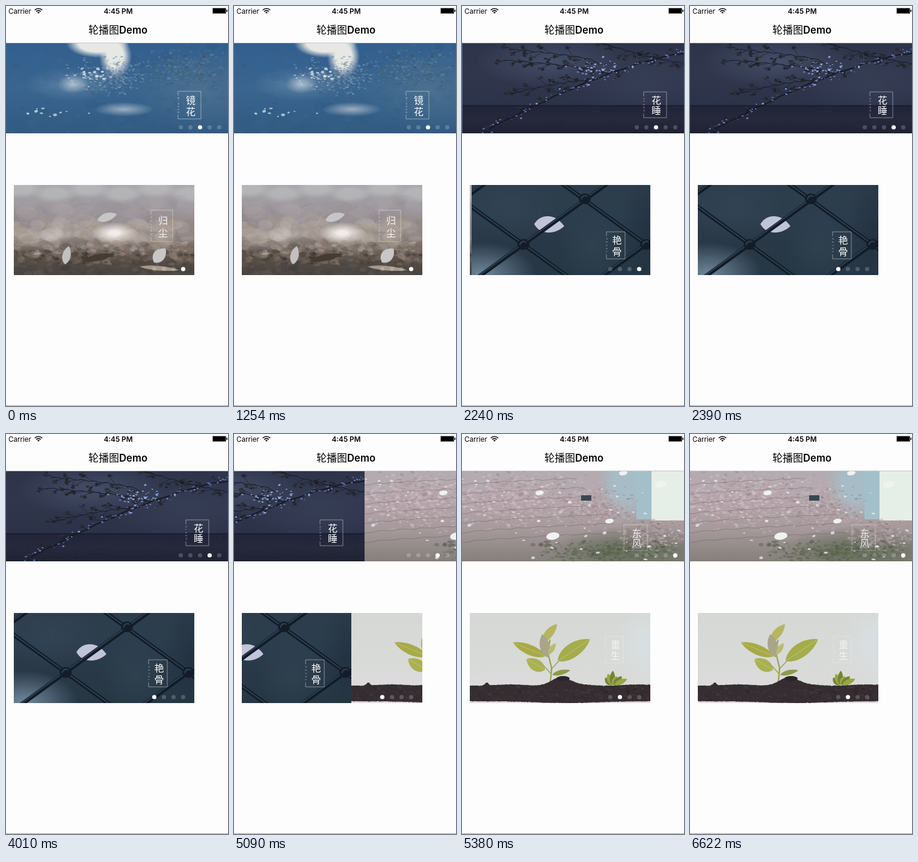
Animation of 369 by 666 pixels, one loop 7450 ms. Source, as an HTML page with a canvas:

```html
<!DOCTYPE html>
<html lang="zh">
<head>
<meta charset="utf-8">
<title>轮播图Demo</title>
<style>
html, body { margin: 0; width: 100%; height: 100%; overflow: hidden; background: #fdfdfd; }
canvas { display: block; width: 369px; height: 666px; }
</style>
</head>
<body>
<canvas id="stage" width="369" height="666"></canvas>
<script>
const screen2d = document.getElementById('stage').getContext('2d');
const SANS = 'Inter, "Noto Sans CJK SC", "Noto Sans CJK", sans-serif';
const TAU = Math.PI * 2;
let g = screen2d;

let seed = 1;
function rand() {
  seed = (seed * 16807) % 2147483647;
  return seed / 2147483647;
}
const spread = n => (rand() + rand() + rand() - 1.5) / 1.5 * n;
const bump = (x, center, width) => Math.exp(-(((x - center) / width) ** 2));

function rect(x, y, w, h, color) {
  g.fillStyle = color;
  g.fillRect(x, y, w, h);
}

function fade(x, y, w, h, ...colors) {
  const fill = g.createLinearGradient(0, y, 0, y + h);
  colors.forEach((c, i) => fill.addColorStop(i / (colors.length - 1), c));
  rect(x, y, w, h, fill);
}

function oval(x, y, rx, ry, color, turn = 0) {
  g.fillStyle = color;
  g.beginPath();
  g.ellipse(x, y, rx, ry, turn, 0, TAU);
  g.fill();
}

// Soft ellipse; core is the solid share of its radius.
function glow(x, y, rx, ry, color, alpha = 1, core = 0) {
  const fill = g.createRadialGradient(0, 0, 0, 0, 0, 1);
  fill.addColorStop(core, color);
  fill.addColorStop(1, color + '00');
  g.save();
  g.globalAlpha = alpha;
  g.translate(x, y);
  g.scale(rx, ry);
  g.fillStyle = fill;
  g.fillRect(-1, -1, 2, 2);
  g.restore();
}

function line(points, width, color) {
  g.strokeStyle = color;
  g.lineWidth = width;
  g.lineCap = g.lineJoin = 'round';
  g.beginPath();
  points.forEach(([x, y]) => g.lineTo(x, y));
  g.stroke();
}

function leaf(x, y, degrees, length, width, color, vein) {
  g.save();
  g.translate(x, y);
  g.rotate(-degrees * Math.PI / 180);
  g.fillStyle = color;
  g.beginPath();
  g.moveTo(0, 0);
  g.bezierCurveTo(length * 0.2, -width * 0.7, length * 0.7, -width * 0.7, length, 0);
  g.bezierCurveTo(length * 0.7, width * 0.6, length * 0.2, width * 0.6, 0, 0);
  g.fill();
  if (vein) line([[0, 0], [length, 0]], 0.8, vein);
  g.restore();
}

// Placement and colour rules for random specks.
const cloud = (x, y, rx, ry) => () => [x + spread(rx), y + spread(ry)];
const field = (x, y, w, h) => () => [x + rand() * w, y + rand() * h];
const along = (path, s) => () => {
  const [x, y] = path[Math.floor(rand() * path.length)];
  return [x + spread(s), y + spread(s * 0.8)];
};
const tint = (hue, sat, light, range, alpha) => () =>
  `hsla(${hue}, ${sat}%, ${light + spread(range)}%, ${alpha})`;

function speckle(count, size, place, shade) {
  for (let i = 0; i < count; i++) {
    const r = size * (0.4 + rand() * 0.8);
    oval(...place(), r, r * (0.35 + rand() * 0.4), shade(), spread(0.6));
  }
}

function bough(x0, y0, x1, y1, bend) {
  return Array.from({ length: 25 }, (_, i) => {
    const k = i / 24;
    return [x0 + (x1 - x0) * k, y0 + (y1 - y0) * k ** bend + Math.sin(i * 1.9)];
  });
}

function caption(x, y, w, h, chars, latin, alpha = 0.8) {
  g.save();
  g.globalAlpha = alpha * 0.8;
  line([[x, y + 7], [x, y], [x + w, y], [x + w, y + h], [x, y + h], [x, y + h - 7]], 0.7, '#fff');
  g.fillStyle = '#fff';
  g.textAlign = 'center';
  g.textBaseline = 'middle';
  g.font = `4px ${SANS}`;
  const step = (h - 18) / latin.length;
  [...latin].forEach((c, i) => {
    g.save();
    g.translate(x, y + 9 + step * (i + 0.5));
    g.rotate(Math.PI / 2);
    g.fillText(c, 0, 0);
    g.restore();
  });
  g.globalAlpha = Math.min(1, alpha + 0.2);
  g.font = `400 16px "Noto Sans CJK SC", "Noto Sans CJK", sans-serif`;
  [...chars].forEach((c, i) => g.fillText(c, x + w / 2 + 2, y + h * (0.32 + i * 0.41)));
  g.restore();
}

function mirror() {
  fade(-2, 62, 375, 150, '#335f8f', '#39658f', '#325a82');
  glow(330, 140, 120, 70, '#587890', 0.6);
  glow(110, 130, 80, 28, '#7896b2', 0.6);
  speckle(260, 9, field(-2, 62, 375, 150), tint(210, 40, 38, 14, 0.13));
  glow(152, 62, 52, 24, '#e7e8e4', 1, 0.6);
  glow(182, 84, 27, 36, '#e7e8e4', 1, 0.5);
  glow(112, 130, 26, 16, '#c3d0da', 0.8);
  glow(196, 172, 50, 12, '#b4c4d2', 0.8);
  speckle(420, 2.4, cloud(175, 115, 90, 42), tint(208, 25, 55, 25, 0.5));
  speckle(500, 2.6, cloud(300, 105, 95, 45), tint(207, 28, 42, 18, 0.5));
  speckle(45, 2.6, cloud(145, 112, 55, 28), tint(205, 30, 85, 9, 0.8));
  speckle(10, 2.8, cloud(90, 175, 80, 20), tint(205, 30, 85, 8, 0.8));
  caption(286, 142, 38, 46, '镜花', 'MIRROR');
}

function sleep() {
  fade(-2, 62, 375, 104, '#2e354b', '#30374d', '#2c3248');
  glow(145, 92, 125, 44, '#525d7b', 0.6);
  glow(300, 130, 120, 60, '#3c455f', 0.5);
  fade(-2, 166, 375, 46, '#222538', '#26293b', '#1f2233');
  line([[-2, 166], [373, 166]], 1.4, '#171a28');
  speckle(260, 1.5, field(-2, 168, 375, 44), tint(232, 20, 16, 8, 0.4));
  const main = bough(373, 78, 38, 207, 1.4);
  const sides = [bough(240, 113, 66, 90, 0.6), bough(225, 97, 75, 72, 0.5),
    bough(373, 96, 230, 62, 1.3), bough(205, 124, 80, 146, 1.5)];
  line(main, 2, '#151823');
  for (const path of [main, ...sides]) {
    line(path, 1, '#171a25');
    for (const [x, y] of path.filter((_, i) => i % 2)) {
      const tip = [x - 8 - rand() * 14, y + spread(18)];
      line([[x, y], tip], 0.7, '#1a1d28');
      speckle(6, 3, along([tip], 9), tint(220, 12, 17, 8, 0.9));
    }
  }
  speckle(85, 1.8, along(main, 14), tint(228, 50, 65, 18, 0.9));
  speckle(55, 2, cloud(215, 103, 65, 24), tint(226, 55, 72, 15, 0.9));
  caption(299, 143, 38, 43, '花睡', 'SLEEP');
}

function eastWind() {
  fade(-2, 62, 375, 150, '#b3abb0', '#b5a8ad', '#a4989a', '#84807a');
  glow(275, 80, 50, 65, '#a6bdc8', 1, 0.4);
  rect(290, 62, 25, 80, '#a3c0ca');
  rect(315, 62, 58, 82, '#e5eee7');
  glow(285, 195, 140, 42, '#69705f', 0.9, 0.3);
  speckle(1100, 3.2, cloud(90, 110, 170, 65), tint(342, 13, 70, 20, 0.55));
  speckle(450, 2.6, cloud(230, 125, 70, 45), tint(342, 10, 66, 22, 0.5));
  speckle(450, 3, cloud(320, 170, 75, 30), tint(345, 8, 62, 22, 0.5));
  speckle(360, 3.4, cloud(235, 195, 150, 22), tint(85, 12, 36, 15, 0.5));
  for (let i = 0; i < 7; i++) {
    line(bough(-2, 85 + i * 16, 190 + i * 12, 74 + i * 15, 0.7), 0.8, 'rgba(88,76,82,.45)');
  }
  rect(198, 102, 17, 9, '#374852');
  speckle(60, 2.8, field(0, 75, 369, 135), tint(220, 15, 92, 5, 0.8));
  for (const [x, y, r] of [[129, 98, 7], [151, 170, 11], [330, 84, 10], [245, 145, 7], [268, 65, 7]]) {
    oval(x, y, r, r * 0.55, '#f0f2f2', -0.15);
  }
  caption(269, 151, 39, 43, '东风', 'EASTWIND', 0.65);
}

function dust() {
  fade(13, 298, 300, 150, '#a8a8ac', '#9d9a9f', '#948d8f', '#877e7a', '#5c534d', '#4a4440');
  for (let i = 0; i < 6; i++) glow(25 + i * 56, 305 + i % 2 * 8, 36, 15, '#bfc0c2', 0.6, 0.5);
  glow(28, 350, 60, 24, '#77707a', 0.5);
  speckle(85, 19, field(13, 325, 300, 40), tint(330, 4, 63, 15, 0.16));
  speckle(110, 16, field(13, 358, 300, 38), tint(28, 13, 66, 26, 0.22));
  glow(180, 378, 40, 18, '#f3ece6', 1, 0.2);
  glow(75, 382, 42, 13, '#d7cfc9', 0.7);
  speckle(170, 8, field(13, 393, 300, 22), tint(25, 11, 53, 32, 0.4));
  speckle(230, 6, field(13, 408, 300, 22), tint(28, 12, 34, 30, 0.5));
  fade(13, 422, 300, 26, '#49423e00', '#4a4541');
  speckle(70, 8, field(13, 426, 300, 22), tint(25, 7, 30, 12, 0.4));
  leaf(152, 357, 18, 34, 14, '#c6c5c8');
  leaf(98, 430, 78, 31, 14, '#c4c0c0');
  leaf(246, 427, 50, 30, 20, '#cac6c5');
  leaf(126, 425, 12, 56, 11, '#443b34');
  leaf(222, 434, -5, 66, 8, '#a69887');
  caption(241, 340, 36, 52, '归尘', 'RETURN', 0.72);
}

function petal() {
  fade(13, 298, 300, 150, '#2d3d4b', '#2c3d4d', '#293846', '#263744');
  glow(75, 335, 80, 55, '#384959', 0.5);
  glow(215, 400, 60, 65, '#344a59', 0.5);
  glow(310, 370, 50, 100, '#1e2c3b', 0.6);
  glow(30, 446, 90, 52, '#7891a6', 0.8, 0.1);
  leaf(117, 363, -4, 50, 28, '#c1c4d8');
  // Each wire zigzags between two neighbouring rows of knots.
  const columns = [-1, 0, 1, 2, 3];
  for (let row = 0; row < 3; row++) {
    const path = columns.map(c => [99 + c * 102, 249 + 74 * (row + Math.abs(row + c) % 2)]);
    line(path, 7, '#111c28');
    line(path.map(([x, y]) => [x - 1, y - 1.3]), 2, '#304150');
  }
  for (let c = 0; c < 3; c++) {
    const x = 99 + c * 102, y = c % 2 ? 321 : 397;
    oval(x, y, 10, 9, '#131d29');
    oval(x - 1, y - 2, 6, 4, '#2d3c4a', -0.5);
    oval(x, y, 5, 3.5, '#131d29', -0.5);
  }
  caption(237, 376, 31, 45, '艳骨', 'PETAL');
}

function rebirth() {
  fade(13, 298, 300, 150, '#d6d8d5', '#d8dad7', '#dcdcdb');
  glow(310, 350, 55, 70, '#d9dfe2', 0.8, 0.3);
  glow(80, 407, 75, 17, '#dfdae0', 0.7);
  line([[147, 412], [149, 390], [143, 365], [146, 343]], 2.2, '#98a04a');
  line([[147, 398], [136, 386]], 1.4, '#98a04a');
  line([[148, 392], [162, 377]], 1.4, '#98a04a');
  leaf(139, 370, 157, 59, 17, '#a8aa48', '#c3c473');
  leaf(159, 378, 34, 65, 24, '#a5ac4b', '#c6ca78');
  leaf(138, 393, 149, 36, 20, '#a9b153', '#c3c97b');
  leaf(134, 346, 51, 38, 14, '#b5b660');
  leaf(143, 372, 104, 40, 17, '#a9a58a');
  leaf(144, 367, 58, 22, 9, '#b9bb70');
  leaf(150, 401, 14, 31, 8, '#8f9a45');
  for (let i = 0; i < 6; i++) leaf(248 + i, 418, 130 - i * 21, 16 + i % 3 * 4, 9, i % 2 ? '#98a645' : '#748336');
  const top = x => 418 + Math.sin(x / 17) - 13 * bump(x, 164, 22) - 5 * bump(x, 41, 4);
  g.fillStyle = '#352d31';
  g.beginPath();
  for (let x = 13; x <= 313; x++) g.lineTo(x, top(x) + spread(0.8));
  for (let x = 313; x >= 13; x--) g.lineTo(x, 445 + 3 * bump(x, 175, 70) + spread(0.8));
  g.fill();
  speckle(300, 3.2, field(13, 421, 300, 23), tint(335, 10, 21, 11, 0.5));
  oval(168, 407, 11, 4, '#29252a');
  caption(238, 337, 30, 44, '重生', 'REBIRTH', 0.5);
}

function makeSlide(paint, { x, y, width }, index) {
  const page = document.createElement('canvas');
  page.width = width;
  page.height = 150;
  g = page.getContext('2d');
  g.translate(-x, -y);
  seed = 7919 * (index + 1);
  paint();
  g = screen2d;
  return page;
}

const banner = { x: -2, y: 62, width: 375, dotX: 290.5, dots: 5, first: 2, progress: [0, 0.416, 0.992] };
const card = { x: 13, y: 298, width: 300, dotX: 246.5, dots: 4, first: 3, progress: [0, 0.393, 0.99] };
banner.slides = [mirror, sleep, eastWind].map((p, i) => makeSlide(p, banner, i));
card.slides = [dust, petal, rebirth].map((p, i) => makeSlide(p, card, i));

function drawCarousel(c, page, phase) {
  const shift = Math.round(c.width * c.progress[phase]);
  g.save();
  g.beginPath();
  g.rect(c.x, c.y, c.width, 150);
  g.clip();
  g.drawImage(c.slides[page], c.x - shift, c.y);
  if (shift) g.drawImage(c.slides[page + 1], c.x + c.width - shift, c.y);
  g.restore();
  for (let i = 0; i < c.dots; i++) {
    const active = i === (c.first + page) % c.dots;
    oval(c.dotX + i * 16, c.y + 140, 3.6, 3.6, active ? '#fff' : 'rgba(255,255,255,.2)');
  }
}

function text(value, x, y, font, align) {
  g.font = `${font} ${SANS}`;
  g.textAlign = align;
  g.textBaseline = 'alphabetic';
  g.fillStyle = '#000';
  g.fillText(value, x, y);
}

function drawHeader() {
  text('Carrier', 4, 12.5, '400 11.6px', 'left');
  text('4:45 PM', 186.5, 12.5, '600 11.8px', 'center');
  text('轮播图', 188, 46, '500 17px', 'right');
  text('Demo', 188, 46, '600 16.7px', 'left');
  g.strokeStyle = '#000';
  g.lineCap = 'butt';
  g.lineWidth = 1.6;
  for (let i = 0; i < 3; i++) {
    g.beginPath();
    g.arc(54, 13, 2 + i * 3.4, -Math.PI * 0.75, -Math.PI * 0.25);
    g.stroke();
  }
  rect(343, 3, 23, 10, 'rgba(0,0,0,.45)');
  rect(344, 4, 21, 8, '#000');
  rect(366.3, 6, 1.5, 4, '#000');
  rect(0, 61, 369, 1, '#c4c6c8');
}

// Every page turn is three hard cuts: two held scroll positions, then rest.
const CUTS = [2090, 2240, 2390, 5090, 5230, 5380];
const LOOP = 7450;
let origin;

function frame(now) {
  origin ??= now;
  const time = (now - origin) % LOOP;
  const passed = CUTS.filter(cut => cut <= time).length;
  const page = Math.floor(passed / 3), phase = passed % 3;
  rect(0, 0, 369, 666, '#fdfdfd');
  drawHeader();
  drawCarousel(banner, page, phase);
  drawCarousel(card, page, phase);
  rect(0, 665, 369, 1, '#a5a5a5');
  requestAnimationFrame(frame);
}
requestAnimationFrame(frame);
</script>
</body>
</html>
```
